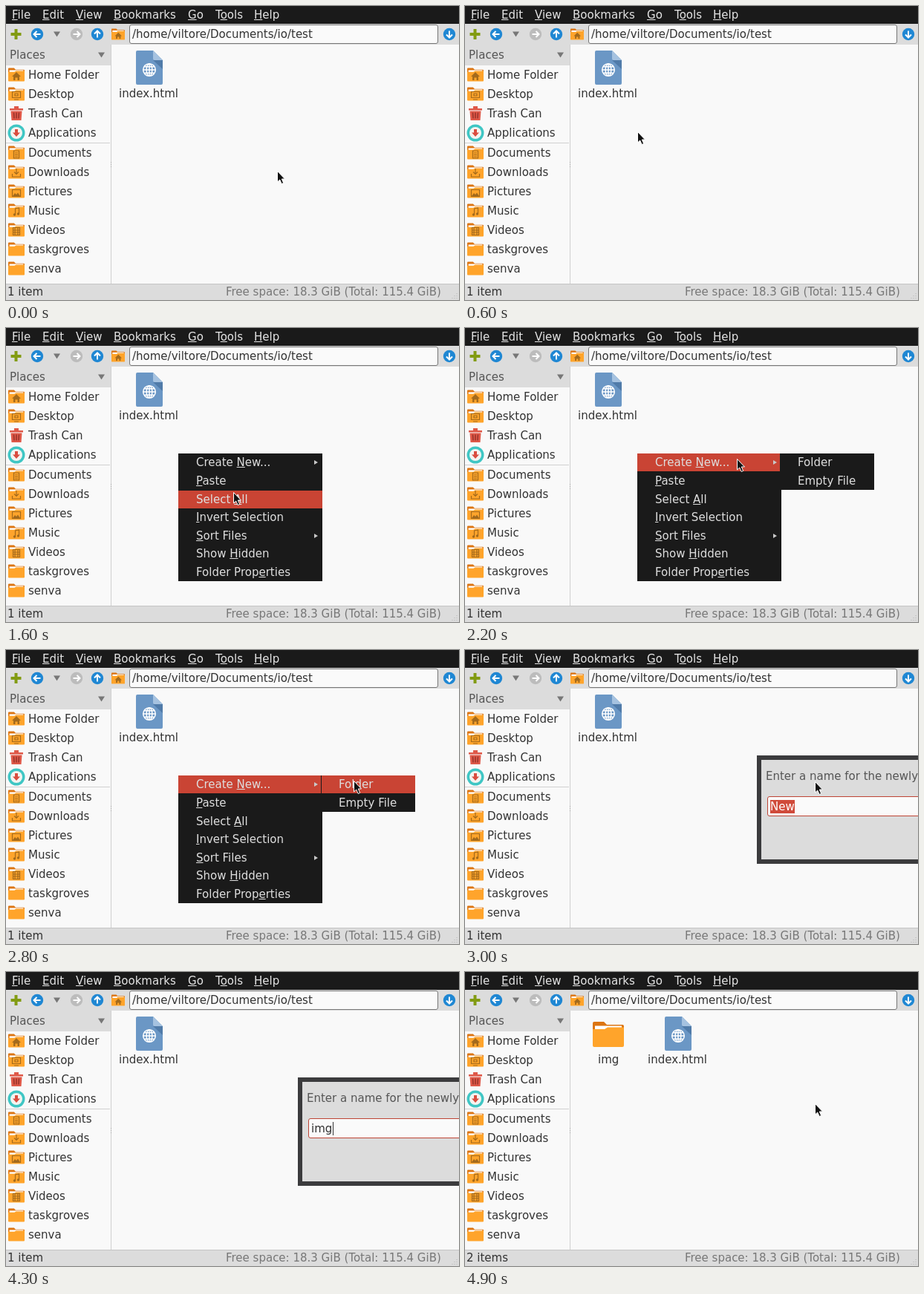
These frames come from a looping animation (610x396 px, 5100 ms). An HTML page:

```html
<!DOCTYPE html>
<html lang="en">
<head>
<meta charset="utf-8">
<title>File manager</title>
<style>
html, body { margin: 0; width: 100%; height: 100%; overflow: hidden; }
body { position: relative; background: #f9f9f9; color: #333; font: 15px/18px "DejaVu Sans", sans-serif; }
svg, span, div { position: absolute; }
svg { left: 0; top: 0; overflow: visible; }
span { white-space: pre; }
u { text-decoration-skip-ink: none; }
.bar { color: #e4e4e4; }
.bar span { top: 3px; }
.places span { left: 30px; }

/* every timeline shares one 5.1 s loop */
.menu, .sub, .mark, .submark, .dialog, .picked, .typed, .before, .after, .pointer {
  animation: 5.1s step-end infinite;
}
.menu { left: 232px; top: 169px; width: 194px; height: 172px; background: #1a1a1a; color: #dedede; animation-name: menu; }
.menu span { left: 24px; }
.mark { left: 0; top: 0; width: 194px; height: 24px; background: #c94434; animation-name: mark; }
.sub { left: 192px; top: 0; width: 127px; height: 49px; background: #1a1a1a; animation-name: sub; }
.submark { left: 1px; top: 0; width: 126px; height: 24px; background: #c94434; animation-name: submark; }
.dialog { left: 393px; top: 142px; width: 400px; height: 134px; border: 6px solid #3b3b3d; background: #dcdcdc; color: #555; animation-name: dialog; }
.entry { left: 8px; top: 49px; width: 380px; height: 25px; border: 1px solid #bd4435; border-radius: 3px; background: #fafafa; }
.picked { left: 3px; top: 4px; background: #d04a3a; color: #fff; animation-name: picked; }
.typed { left: 3px; top: 4px; overflow: hidden; border-right: 1px solid #333; color: #333; animation-name: typed; }
.before { animation-name: before; }
.after { animation-name: after; }
.pointer { left: 0; top: 0; animation-name: travel, blank; }

@keyframes menu { 0% { opacity: 0 } 15.68% { opacity: 1 } 56.86%, 100% { opacity: 0 } }
@keyframes mark {
  0% { transform: none }
  27.45% { transform: translateY(25px) }
  31.37% { transform: translateY(50px) }
  33.33% { transform: translateY(25px) }
  35.29%, 100% { transform: none }
}
@keyframes sub { 0% { opacity: 0 } 35.29%, 100% { opacity: 1 } }
@keyframes submark { 0% { opacity: 0 } 50.98%, 100% { opacity: 1 } }
@keyframes dialog { 0% { opacity: 0 } 58.82% { opacity: 1 } 86.27%, 100% { opacity: 0 } }
@keyframes picked { 0% { opacity: 1 } 76.47%, 100% { opacity: 0 } }
@keyframes typed {
  0% { opacity: 0; width: 0 }
  76.47% { opacity: 1; width: 4px }
  78.43% { opacity: 1; width: 19px }
  80.39%, 100% { opacity: 1; width: 29px }
}
@keyframes before { 0% { opacity: 1 } 88.23%, 100% { opacity: 0 } }
@keyframes after { 0% { opacity: 0 } 88.23%, 100% { opacity: 1 } }
@keyframes travel {
  0% { transform: translate(365px, 222px); animation-timing-function: steps(6) }
  11.76% { transform: translate(232px, 169px) }
  23.52% { transform: translate(232px, 169px); animation-timing-function: steps(4) }
  31.37% { transform: translate(306px, 221px); animation-timing-function: steps(2) }
  35.29% { transform: translate(366px, 176px) }
  45.09% { transform: translate(366px, 176px); animation-timing-function: steps(4) }
  52.94% { transform: translate(468px, 176px) }
  56.86%, 100% { transform: translate(471px, 177px) }
}
@keyframes blank { 0% { opacity: 1 } 76.47% { opacity: 0 } 88.23%, 100% { opacity: 1 } }
</style>
</head>
<body>
<svg width="610" height="396">
  <defs>
    <symbol id="folder" viewBox="0 0 42 36" preserveAspectRatio="none">
      <path d="M0 12V3q0-2 2-2h13l4 4h21q2 0 2 2v8H0z" fill="#dc7512"/>
      <path d="M3 6.5h36V12H3z" fill="#fff"/>
      <path d="M0 11h16l4-2.5h22V33q0 2-2 2H2q-2 0-2-2z" fill="#ffa42b"/>
    </symbol>
    <symbol id="page" viewBox="0 0 36 46">
      <path d="M2 0h21l13 13v31q0 2-2 2H2q-2 0-2-2V2q0-2 2-2z" fill="#6b97c5"/>
      <path d="M23 13h13v12z" fill="#507ba9"/>
      <path d="M23 0l13 13H25q-2 0-2-2z" fill="#a5c2e0"/>
      <g fill="none" stroke="#fff" stroke-width="1.5">
        <circle cx="18" cy="26" r="8.3"/>
        <ellipse cx="18" cy="26" rx="3.8" ry="8.3"/>
        <path d="M18 18v16M10 26h16M11.5 21.7h13M11.5 30.3h13"/>
      </g>
    </symbol>
    <symbol id="house" viewBox="0 0 12 11"><path d="M6 0l6 6h-2v5H7.5V7.5h-3V11H2V6H0z" fill="#a36a1c"/></symbol>
    <g id="arrow" fill="none" stroke="#fff" stroke-width="2"><path d="M-4.5 0h9M-.5-4l-4 4 4 4"/></g>
  </defs>

  <path d="M0 0h610v24H0z" fill="#1a1a1a"/>
  <path d="M0 24h610v28H0zM0 52h141v28H0zM0 374h610v22H0z" fill="#dcdcdc"/>
  <path d="M0 374.5h610" stroke="#c4c4c4"/>
  <path d="M141.5 52v322M0 184.5h140" stroke="#d0d0d0"/>
  <path d="M141.5 210v8" stroke="#aaa" stroke-dasharray="1 2"/>
  <path d="M607 387v8M604 390v5M601 393v2" stroke="#b0b0b0" stroke-dasharray="1 2"/>
  <rect x="166.5" y="25.5" width="415" height="25" rx="2.5" fill="#fafafa" stroke="#777"/>

  <path d="M13.5 31v14M6.500 38h14" stroke="#829b12" stroke-width="4"/>
  <path d="M64 34.500h9l-4.500 7zM124 62.500h9l-4.500 7z" fill="#777"/>
  <g fill="#1f87d3">
    <circle cx="42" cy="38" r="8.200"/><circle cx="123" cy="38" r="8.200"/><circle cx="597" cy="38" r="8.200"/>
    <circle cx="95" cy="38" r="8.200" fill="#bcbcbc"/>
  </g>
  <use href="#arrow" transform="translate(42 38)"/>
  <use href="#arrow" transform="translate(95 38) scale(-1 1)"/>
  <use href="#arrow" transform="translate(123 38) rotate(90)"/>
  <use href="#arrow" transform="translate(597 38) rotate(-90)"/>
  <use href="#folder" x="142" y="30" width="18" height="16"/>
  <use href="#house" x="146.500" y="35.500" width="9.500" height="9"/>

  <g id="shelf">
    <use href="#folder" x="3" y="83" width="22" height="19"/>
    <use href="#folder" x="3" y="109" width="22" height="19"/>
    <use href="#folder" x="3" y="188" width="22" height="19"/>
    <use href="#folder" x="3" y="214" width="22" height="19"/>
    <use href="#folder" x="3" y="240" width="22" height="19"/>
    <use href="#folder" x="3" y="266" width="22" height="19"/>
    <use href="#folder" x="3" y="292" width="22" height="19"/>
    <use href="#folder" x="3" y="318" width="22" height="19"/>
    <use href="#folder" x="3" y="344" width="22" height="19"/>
  </g>
  <use href="#house" x="8" y="89" width="12" height="11"/>
  <g fill="none" stroke="#a36a1c" stroke-width="1.200">
    <path d="M8.500 115.500h11v8h-11zM11 126h6M12 118h4v3h-4z"/>
    <path d="M10.500 195h7v10h-7zM12 198h4M12 200.500h4M12 203h4"/>
    <path d="M14 219v7M11 223.500l3 3 3-3M8.500 226v4h11v-4"/>
    <path d="M8.500 247.500h11v9h-11z"/>
    <path d="M12.500 281v-8l5-1v8"/>
    <path d="M9.500 298.500h9v10h-9zM12 298v10M16 298v10M9 302h10M9 305h10"/>
  </g>
  <g fill="#a36a1c">
    <path d="M9 256l3-4 2 2 2-2.500 3 4.500z"/>
    <circle cx="11.500" cy="281" r="1.700"/><circle cx="16.500" cy="280" r="1.700"/>
  </g>
  <path d="M5 138h18v2.500H5zM11 135h6v3h-6zM6.500 141.500h15l-1 12.500h-13z" fill="#df5848"/>
  <path d="M10.500 143.500l.5 8M14 143.500v8M17.500 143.500l-.5 8" stroke="#8f3027" stroke-width="1.400"/>
  <circle cx="14" cy="171" r="11.500" fill="#3fc6c4"/>
  <circle cx="14" cy="171" r="8" fill="#f4f4f0"/>
  <path d="M12 166h4v4.500h3l-5 5.500-5-5.500h3z" fill="#d94d3f"/>
</svg>

<div class="bar">
  <span style="left:8px"><u>F</u>ile</span>
  <span style="left:49px"><u>E</u>dit</span>
  <span style="left:94px"><u>V</u>iew</span>
  <span style="left:145px"><u>B</u>ookmarks</span>
  <span style="left:245px"><u>G</u>o</span>
  <span style="left:282px">T<u>o</u>ols</span>
  <span style="left:334px"><u>H</u>elp</span>
</div>
<span style="left:170px;top:29px">/home/viltore/Documents/io/test</span>
<span style="left:5px;top:57px;color:#555">Places</span>
<div class="places">
  <span style="top:84px">Home Folder</span>
  <span style="top:110px">Desktop</span>
  <span style="top:136px">Trash Can</span>
  <span style="top:162px">Applications</span>
  <span style="top:189px">Documents</span>
  <span style="top:215px">Downloads</span>
  <span style="top:241px">Pictures</span>
  <span style="top:267px">Music</span>
  <span style="top:293px">Videos</span>
  <span style="top:319px">taskgroves</span>
  <span style="top:345px">senva</span>
</div>
<span style="left:296px;top:376px;color:#777">Free space: 18.3 GiB (Total: 115.4 GiB)</span>

<div class="before">
  <svg width="1" height="1"><use href="#page" x="175" y="60" width="36" height="46"/></svg>
  <span style="left:152px;top:109px">index.html</span>
  <span style="left:2px;top:376px">1 item</span>
</div>
<div class="after">
  <svg width="1" height="1">
    <use href="#folder" x="172" y="66" width="42" height="36"/>
    <use href="#page" x="269" y="60" width="36" height="46"/>
  </svg>
  <span style="left:179px;top:109px">img</span>
  <span style="left:246px;top:109px">index.html</span>
  <span style="left:2px;top:376px">2 items</span>
</div>

<div class="menu">
  <div class="mark"></div>
  <span style="top:3px">Create <u>N</u>ew...</span>
  <span style="top:28px"><u>P</u>aste</span>
  <span style="top:53px">Select <u>A</u>ll</span>
  <span style="top:77px"><u>I</u>nvert Selection</span>
  <span style="top:102px"><u>S</u>ort Files</span>
  <span style="top:126px">Show <u>H</u>idden</span>
  <span style="top:151px">Folder Prop<u>e</u>rties</span>
  <svg width="194" height="172"><path d="M183 9l5 3-5 3zM183 108l5 3-5 3z" fill="#c8c8c8"/></svg>
  <div class="sub">
    <div class="submark"></div>
    <span style="top:3px">Folder</span>
    <span style="top:28px">Empty File</span>
  </div>
</div>

<div class="dialog">
  <span style="left:6px;top:13px">Enter a name for the newly created folder:</span>
  <div class="entry">
    <span class="picked">New</span>
    <span class="typed">img</span>
  </div>
</div>

<svg class="pointer" width="12" height="20">
  <path d="M.5 .5v14.500l3.200-3 2.500 5.500 2.500-1.100-2.400-5.400h4.200z" fill="#111" stroke="#fff"/>
</svg>
</body>
</html>
```
